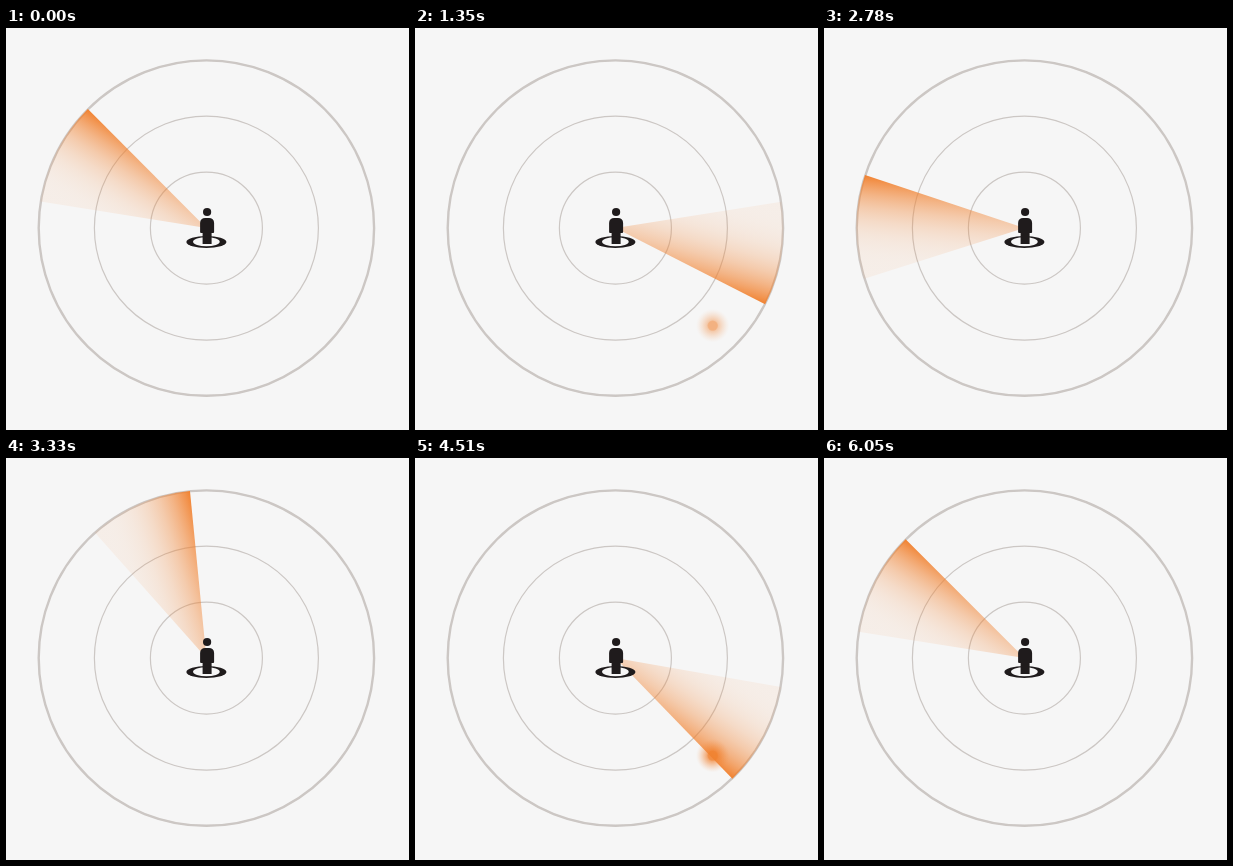
Recreate the animation shown at these times as an HTML page with a canvas. Size 403 by 402 pixels, loop 6.11 s.

```html
<!DOCTYPE html>
<html>
<head>
<meta charset="utf-8">
<style>
html, body { margin: 0; width: 100%; height: 100%; overflow: hidden; background: #f6f6f6; }
canvas { display: block; }
</style>
</head>
<body>
<canvas id="stage" width="403" height="402"></canvas>
<script>
const ctx = document.getElementById('stage').getContext('2d');
const LOOP = 6110, SPEED = .1199, START = 225;   // ms, degrees per ms, degrees
const TAU = Math.PI * 2, RAD = Math.PI / 180;
const R = 168, SPAN = 36, TILT = 12, DOT_ANGLE = 45;
const INK = '#1f1b1c', PAPER = '#f6f6f6', LINE = '#ccc7c4';
const orange = a => `rgba(241,128,45,${a})`;

// Fills a gradient with orange whose opacity follows a curve over 0..1
function shade(gradient, curve) {
  for (let s = 0; s <= 16; s++) gradient.addColorStop(s / 16, orange(curve(s / 16)));
  return gradient;
}

function ellipse(x, y, rx, ry, fill) {
  ctx.beginPath();
  ctx.ellipse(x, y, rx, ry, 0, 0, TAU);
  ctx.fillStyle = fill;
  ctx.fill();
}

function ring(r, width) {
  ctx.beginPath();
  ctx.arc(0, 0, r, 0, TAU);
  ctx.lineWidth = width;
  ctx.strokeStyle = LINE;
  ctx.stroke();
}

// A sector with a straight gradient running slightly askew of its leading edge
function beam(angle) {
  const front = TILT * RAD, back = (TILT - SPAN) * RAD;
  ctx.save();
  ctx.rotate((angle - TILT) * RAD);
  ctx.beginPath();
  ctx.moveTo(0, 0);
  ctx.arc(0, 0, R, back, front);
  ctx.fillStyle = shade(
    ctx.createLinearGradient(0, R * Math.sin(front), 0, R * Math.sin(back)),
    s => .07 + .91 * (1 - s) ** 3);
  ctx.fill();
  ctx.restore();
}

// Brightens ahead of the beam, fades after it has passed
function dot(angle) {
  const lead = angle % 360 - DOT_ANGLE;
  const alpha = lead < 0 ? 1 + lead / 42 : 1 - lead / 77;
  if (alpha <= 0) return;
  ctx.save();
  ctx.globalAlpha = alpha;
  ctx.translate(97.3, 97.5);
  ellipse(0, 0, 17, 17, shade(ctx.createRadialGradient(0, 0, 4, 0, 0, 17), s => .8 * (1 - s) ** 1.4));
  ellipse(0, 0, 5.2, 5.2, orange(.4));
  ctx.restore();
}

function person() {
  ellipse(0, 13.9, 20, 6, INK);
  ellipse(0, 13.7, 13.3, 4.5, PAPER);
  ellipse(.7, -16.1, 4.1, 4.1, INK);
  ctx.beginPath();
  ctx.roundRect(-6.3, -10.2, 14, 15.2, [5, 5, 1, 1]);
  ctx.rect(-3.8, 4, 9, 12);
  ctx.fill();
}

function draw(time) {
  // two full turns, then a short rest
  const angle = START + Math.min(720, SPEED * time);
  ctx.setTransform(1, 0, 0, 1, 0, 0);
  ctx.fillStyle = PAPER;
  ctx.fillRect(0, 0, 403, 402);
  ctx.translate(200.4, 200.1);
  ring(R - .3, 2.4);
  ring(R * 2 / 3, 1.2);
  ring(R / 3, 1.2);
  beam(angle);
  dot(angle);
  person();
}

const start = performance.now();
function tick() {
  draw((performance.now() - start) % LOOP);
  requestAnimationFrame(tick);
}
tick();
</script>
</body>
</html>
```
